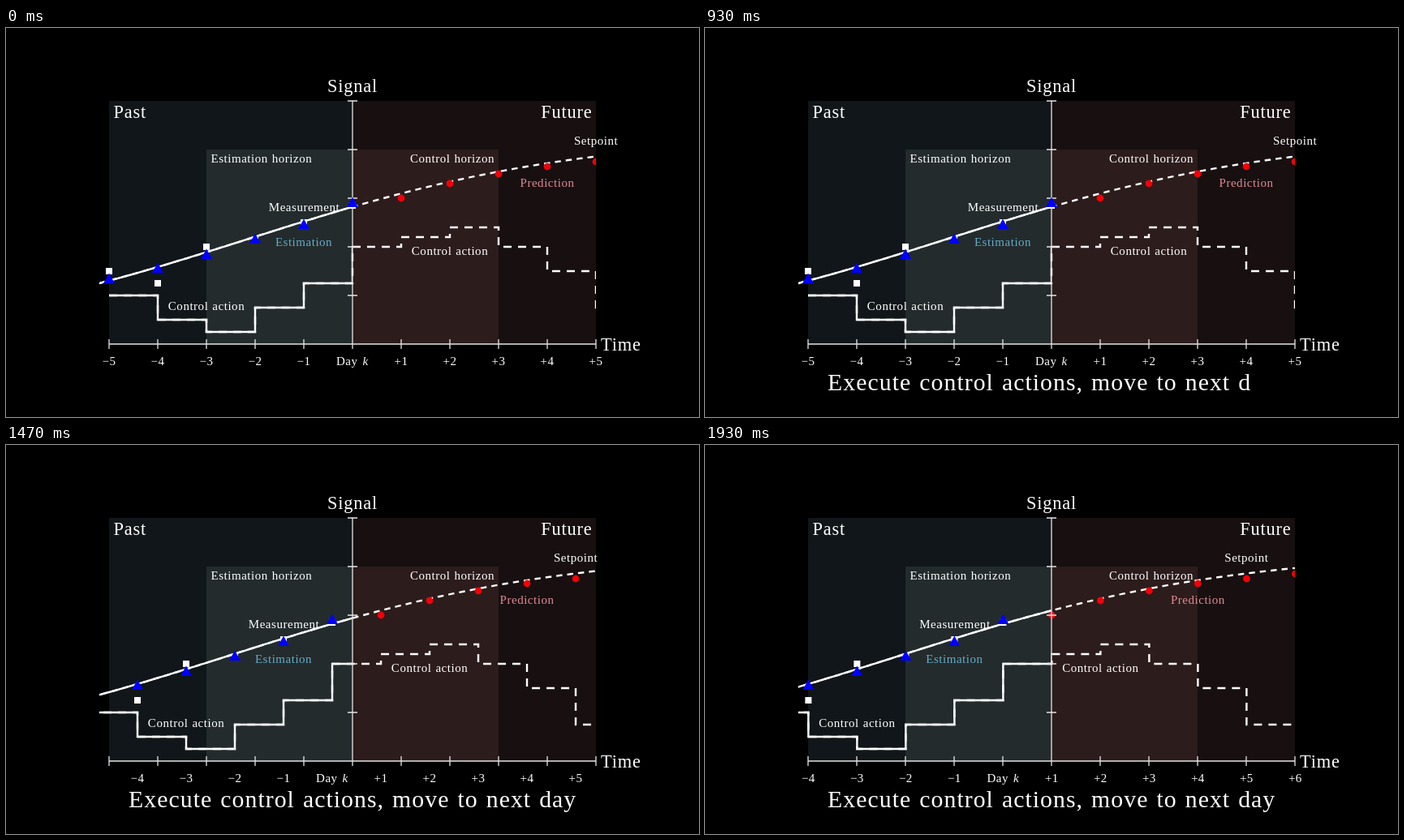
Animation of 854 by 480 pixels, one loop 1990 ms. Source, as an HTML page with a canvas:

```html
<!DOCTYPE html>
<html lang="en">
<head>
<meta charset="utf-8">
<title>Moving horizon estimation and control</title>
<style>
html, body { margin: 0; height: 100%; overflow: hidden; background: #000; }
canvas { display: block; }
</style>
</head>
<body>
<canvas id="stage" width="854" height="480"></canvas>
<script>
const ctx = document.getElementById('stage').getContext('2d');
const LOOP = 1990, FPS = 15, UNIT = 60, OX = 427, OY = 390;
const LEFT = 115, RIGHT = 727;
const TITLE = 'Execute control actions, move to next day';
const LETTERS = TITLE.replace(/ /g, '').length;

const squares = [300, 315, 270, 262, 240, 219];     // from day -5
const estimates = [310, 297, 280, 261, 243, 216];   // from day -5
const predictions = [210, 192, 180, 171, 165, 159]; // from day +1
const actions = [330, 360, 375, 345, 315, 270, 258, 246, 270, 300, 345];

const dayX = day => OX + day * UNIT;
const setpoint = day => OY - 260.2 / (1 + Math.exp(-0.2933 * (day + 2.12)));

function smooth(t) {
  const sig = x => 1 / (1 + Math.exp(-x));
  const edge = sig(-5);
  return (sig(10 * (t - 0.5)) - edge) / (1 - 2 * edge);
}

function setFont(size, style = '') {
  ctx.font = `${style} ${size}px "Liberation Serif", "Times New Roman", serif`;
  ctx.letterSpacing = `${size * 0.035}px`;
  ctx.wordSpacing = `${size * 0.05}px`;
}

function text(str, x, y, size = 15, align = 'left', color = '#fff', style) {
  setFont(size, style);
  ctx.textAlign = align;
  ctx.fillStyle = color;
  ctx.fillText(str, x, y);
}

function box(x, y, w, h, color) {
  ctx.fillStyle = color;
  ctx.fillRect(x, y, w, h);
}

function clipped(x0, x1, draw) {
  ctx.save();
  ctx.beginPath();
  ctx.rect(x0, 0, x1 - x0, 480);
  ctx.clip();
  draw();
  ctx.restore();
}

const curve = new Path2D();
for (let day = -5.4; day < 6.3; day += 0.1) curve.lineTo(dayX(day), setpoint(day));

const steps = new Path2D();
actions.forEach((y, i) => {
  steps.lineTo(dayX(i - 5), y);
  steps.lineTo(dayX(i - 4), y);
});

function lines(shift, dashed) {
  ctx.save();
  ctx.translate(-shift, 0);
  ctx.strokeStyle = '#fff';
  ctx.lineWidth = 2.4;
  ctx.setLineDash(dashed ? [10, 8] : []);
  ctx.stroke(steps);
  ctx.setLineDash(dashed ? [7.5, 6] : []);
  ctx.stroke(curve);
  ctx.restore();
}

function dots(shift) {
  squares.forEach((y, i) => box(dayX(i - 5) - shift - 4, y - 4, 8, 8, '#fff'));
  ctx.fillStyle = '#f20008';
  predictions.forEach((y, i) => {
    ctx.beginPath();
    ctx.arc(dayX(i + 1) - shift, y, 4.4, 0, 7);
    ctx.fill();
  });
}

function triangles(shift) {
  ctx.fillStyle = '#00f';
  estimates.forEach((y, i) => {
    const x = dayX(i - 5) - shift;
    ctx.beginPath();
    ctx.moveTo(x, y - 7.5);
    ctx.lineTo(x + 7, y + 5);
    ctx.lineTo(x - 7, y + 5);
    ctx.fill();
  });
}

function axes() {
  ctx.beginPath();
  ctx.moveTo(dayX(-5), OY);
  ctx.lineTo(dayX(5), OY);
  ctx.moveTo(OX, OY);
  ctx.lineTo(OX, 90);
  for (let day = -5; day <= 5; day++) {
    ctx.moveTo(dayX(day), OY - 6);
    ctx.lineTo(dayX(day), OY + 6);
  }
  for (let y = 90; y < OY; y += UNIT) {
    ctx.moveTo(OX - 6, y);
    ctx.lineTo(OX + 6, y);
  }
  ctx.strokeStyle = '#e4e4e4';
  ctx.lineWidth = 1.3;
  ctx.stroke();
}

function dayLabels(shift) {
  for (let day = -5; day <= 6; day++) {
    const x = dayX(day) - shift;
    if (day) text((day < 0 ? '−' : '+') + Math.abs(day), x, 416, 15, 'center');
    else {
      text('Day', x - 20, 416);
      text('k', x + 12.5, 416, 15, 'left', '#fff', 'italic');
    }
  }
}

// Letters appear one after another; the newest one is revealed from its left side.
function title(progress) {
  const shown = Math.min(progress, 1) * LETTERS;
  let whole = Math.floor(shown + 1e-6), end = 0;
  const part = Math.min(1, (shown - whole) * 1.5);
  while (end < TITLE.length && (TITLE[end] === ' ' || whole-- > 0)) end++;
  setFont(29.8);
  const width = n => ctx.measureText(TITLE.slice(0, n)).width;
  const edge = width(end) + part * (width(end + 1) - width(end));
  clipped(150, 151 + edge, () => text(TITLE, 151, 447, 29.8));
}

function draw(time) {
  const shift = time > 1 ? UNIT * smooth(time - 1) : 0;
  box(0, 0, 854, 480, '#000');
  box(127, 90, 300, 300, '#101619');
  box(427, 90, 300, 300, '#170f10');
  box(247, 150, 180, 240, '#232b2d');
  box(427, 150, 180, 240, '#2c1c1b');

  clipped(LEFT, RIGHT, () => {
    lines(shift, true);
    clipped(LEFT, OX, () => lines(shift, false));
    dots(shift);
  });
  axes();
  clipped(LEFT, RIGHT, () => triangles(shift));

  text('Signal', OX, 79, 22.4, 'center');
  text('Time', 733, 398, 22.4);
  text('Past', 132.5, 111, 22.4);
  text('Future', 722.5, 111, 22.4, 'right');
  text('Estimation horizon', 252.5, 166);
  text('Control horizon', 602, 166, 15, 'right');

  text('Measurement', 367.5 - shift, 226, 15, 'center');
  text('Estimation', 367 - shift, 269, 15, 'center', '#64acc6');
  text('Control action', 247 - shift, 348, 15, 'center');
  text('Control action', 547 - shift, 280, 15, 'center');
  text('Prediction', 667 - shift, 195.5, 15, 'center', '#e08a92');
  text('Setpoint', 727 - shift, 143.5, 15, 'center');
  clipped(LEFT, 739, () => dayLabels(shift));
  title(time);
}

const start = performance.now();
function tick() {
  const t = (performance.now() - start) % LOOP;
  draw(Math.floor((t + 3.4) * FPS / 1000) / FPS);
  requestAnimationFrame(tick);
}
tick();
</script>
</body>
</html>
```
